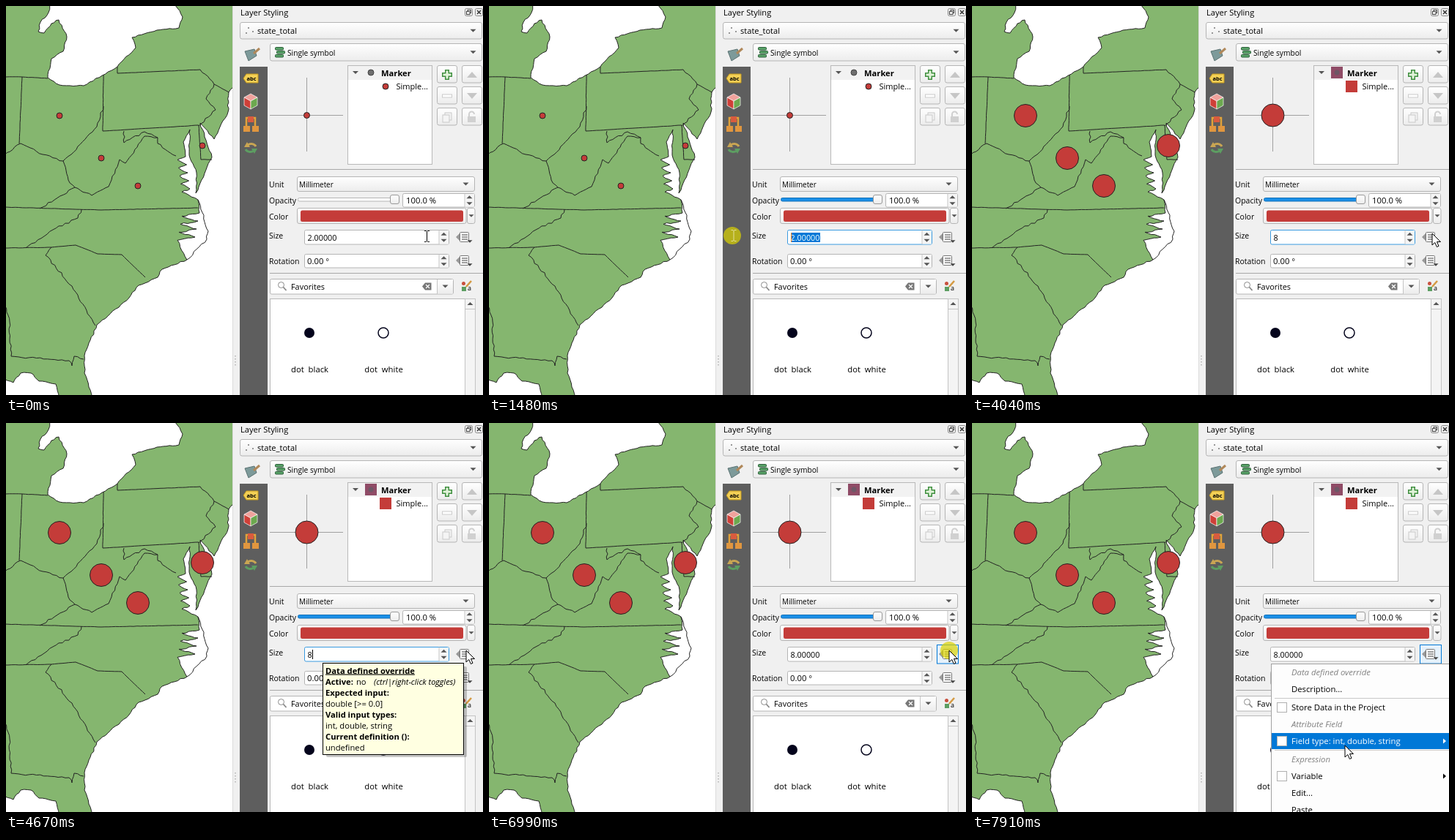
Write an HTML page that moves like this. It is 651x532 px and loops after 7990 ms.

```html
<!DOCTYPE html>
<html lang="en">
<head>
<meta charset="utf-8">
<title>Layer styling panel</title>
<style>
  html, body { margin: 0; width: 100%; height: 100%; overflow: hidden; background: #fff; }
  svg { display: block; width: 100vw; height: 100vh; }
  text { font-family: "Open Sans", "Noto Sans", sans-serif; white-space: pre; }
</style>
</head>
<body>
<svg id="stage" viewBox="0 0 651 532"></svg>
<script>
const LOOP = 7990, RED = '#c43c39', BLUE = '#0078d7', INK = '#232323', EDGE = '#b5b5b5';
const stage = document.getElementById('stage');

// ---- drawing helpers (return SVG markup) ----
const rect = (x, y, w, h, fill, stroke = 'none', r = 0, more = '') =>
  `<rect x="${x}" y="${y}" width="${w}" height="${h}" rx="${r}" fill="${fill}" stroke="${stroke}" ${more}/>`;
const circle = (x, y, r, fill, stroke = 'none', more = '') =>
  `<circle cx="${x}" cy="${y}" r="${r}" fill="${fill}" stroke="${stroke}" ${more}/>`;
const path = (d, fill = 'none', stroke = 'none', width = 1, more = '') =>
  `<path d="${d}" fill="${fill}" stroke="${stroke}" stroke-width="${width}" ${more}/>`;
const line = (d, stroke = '#a8a8a8', width = 1) => path(d, 'none', stroke, width);
const text = (x, y, s, size = 10.7, more = '') =>
  `<text x="${x}" y="${y}" font-size="${size}" ${more}>${s}</text>`;
const group = (id, content) => `<g id="${id}">${content}</g>`;
const each = (list, draw) => list.map(draw).join('');
const triangle = (x, y, dy = 4, half = 4, fill = '#555') =>
  path(`M${x - half} ${y - dy / 2}h${2 * half}l${-half} ${dy}z`, fill);
const button = (x, y, w, h) => rect(x, y, w, h, 'url(#face)', EDGE, 2.5);
const combo = (x, y, w, h) => button(x, y, w, h) + triangle(x + w - 12, y + h / 2);
const spin = (x, y, w, h, id = 'fixed') => rect(x, y, w, h, '#fff', EDGE, 2, `id="${id}"`) +
  rect(x + w - 13, y + .5, 12.5, h - 1, '#f5f5f5') + line(`M${x + w - 13.5} ${y}v${h}`, '#c4c4c4') +
  each([-4, 4], dy => triangle(x + w - 7, y + h / 2 + dy * 1.1, dy));

// ---- map ----
let seed = 7;
const random = () => (seed = seed * 16807 % 2147483647) / 2147483647;

// Breaks a polyline into short pieces and pushes them sideways for a natural edge.
function rough(points, amount) {
  const pts = points.split(' ').map(p => p.split(',').map(Number));
  const out = [pts[0]];
  for (let i = 1; i < pts.length; i++) {
    const [ax, ay] = pts[i - 1], [bx, by] = pts[i];
    const length = Math.hypot(bx - ax, by - ay), n = Math.ceil(length / 5);
    for (let k = 1; k <= n; k++) {
      const push = k < n ? (random() - .5) * 2 * amount / length : 0;
      out.push([ax + (bx - ax) * k / n - (by - ay) * push, ay + (by - ay) * k / n + (bx - ax) * push]);
    }
  }
  return out.map(p => p.map(v => v.toFixed(1)).join(' ')).join('L');
}

// A shore cut by evenly spaced narrow inlets.
const inlets = (x, y, dx, dy, n, depth) => Array.from({ length: n }, (_, i) =>
  `${x + dx * i},${y + dy * i} ${x + dx * i - depth},${y + dy * (i + .4)}`).join(' ');

const coast = [
  '-5,-5 61,-5 58,9 47,22 44,35 52,37 62,24 72,19 83,42 78,62 62,72 57,98 73,108 106,109 152,83 177,57 172,43 206,33 236,30 241,15 229,-5',
  '315,-5 315,106 304,118 303,145 284,182 265,160 281,207 259,256',
  '260,228 250,204 251,169 242,186', inlets(245, 206, 1.5, 11, 5, 11), '262,265',
  inlets(264, 283, -2, 11, 4, 24), '247,347 213,360 207,371 181,382 168,399 124,436 107,478 107,502 119,540',
  '74,540 68,517 45,513 34,502 20,502 10,515 -5,510'
].join(' ');

const rivers = [
  '133,137 124,165 89,203 78,212 50,203 20,188 -2,204',
  '78,212 85,238 94,248 46,277',
  '94,248 117,259 140,247 155,210 163,215 189,178 207,180',
  '161,171 161,187 189,172 207,180 207,188 232,205',
  '265,87 284,107 273,127 286,142 263,164',
  '103,278 98,290 64,306 27,331',
  '62,330 54,341 90,383 122,437',
  '-2,405 5,432 7,479 86,485 90,492 93,479 106,483',
  '262,265 276,308 274,319 247,347'
];
const straight = [
  '0,97 22,97 57,99', '22,97 18,188', '133,94 132,171 263,163 266,210 281,210', '152,83 152,92 265,87',
  '284,107 304,118', '-2,275 130,279 262,276', '-2,331 62,330 95,327 125,339 158,340 190,371'
];
const borders = each(rivers, p => 'M' + rough(p, 1.3)) + each(straight, p => 'M' + rough(p, .2));
const marker = (x, y, cls) => circle(x, y, 4, RED, INK, `class="${cls}"`);
const map = rect(0, 0, 310, 532, '#fff') + path(`M${rough(coast, 1)}Z`, '#85b66f', INK) + line(borders, INK) +
  each([[73, 150], [130, 208], [180, 246], [268, 191]], ([x, y]) => marker(x, y, 'marker'));

// ---- styling panel ----
const overrideIcon = y => path(`M614 ${y}l6 -6v12z`, '#999') + rect(619.5, y - 6.5, 12, 13, '#fff', '#777', 1) +
  each([-3, 0, 3], dy => line(`M622 ${y + dy}h8`, '#777', 1.4)) + triangle(633, y + 6, 3.5, 3.5, '#444');

const windowButtons = each([626.5, 640.5], x => rect(x, 3.5, 10, 10, '#f0f0f0', '#888', 2)) +
  rect(630, 5.5, 4.5, 4, 'none', '#444') + rect(628.5, 7.5, 4.5, 4, '#f0f0f0', '#444') + line('M643 6l5 5m0 -5l-5 5', '#333', 1.5);

const arc = (y, color, turn) => `<g transform="rotate(${turn} 334 ${y})">` +
  line(`M341 ${y - 2}a7 6 0 0 0 -11 -2`, color, 3) + path(`M325 ${y - 1}l4 -7l4 7z`, color) + '</g>';
const sideBar = rect(319, 83, 38, 449, '#5e5e5e') +
  path('M326 62l13 -3l3 9l-11 7z', '#7d9a9a', '#5c7373') + line('M338 65l8 -7', '#b0885a', 3) +
  path('M324 99l4 -6h16v12h-16z', '#f3cf55', '#c59b1f') + text(328.5, 102, 'abc', 7.5, 'font-weight="bold"') +
  each([['l9 -5l9 5l-9 5z', '#f0a29c'], ['v11l9 5v-11z', '#cf4038'], ['m18 0v11l-9 5v-11z', '#6ca84f']],
    ([d, fill]) => path('M325 125' + d, fill, '#fff', .7)) +
  line('M328 164v-11h12v11', '#e2a23a', 2.5) + rect(330, 151, 8, 8, '#d95b3e') +
  each([324, 336], x => rect(x, 164, 9, 8, '#e0963f')) + arc(194, '#c9a553', 0) + arc(194, '#5d9e62', 180);

const toolButtons = each([82, 111, 140], y => each([588.5, 622.5], x => button(x, y - .5, 27, 23.5))) +
  line('M602 87v14M595 94h14', '#3f8f3f', 6) + line('M602 88.5v11M596.5 94h11', '#e2f3da', 3) +
  triangle(636, 94, -8, 7, '#c6c6c6') + triangle(636, 123, 8, 7, '#c6c6c6') + rect(595.5, 121, 13, 4, '#fff', '#ccc') +
  each([0, 3], d => rect(599 - d, 146 + d, 9, 10, '#f4f4f4', '#c9c9c9')) +
  rect(630, 151, 11, 8, '#d0d0d0') + line('M632 151v-3a3.5 3.5 0 0 1 7 0', '#d0d0d0', 2);

const symbolTree = rect(466.5, 81.5, 115, 135, '#fff', '#b9b9b9') + rect(467, 82, 114, 19, '#f2f2f2') + triangle(477, 91) +
  text(512, 96, 'Marker', 11.2, 'font-weight="bold"') + text(532.5, 114, 'Simple...', 11) +
  group('smallTree', circle(498, 91, 4, '#6e6e6e', '#444') + circle(518, 110, 4, RED, INK)) +
  group('bigTree', rect(490, 83, 16, 16, '#8f4b66') + circle(498, 91, 3.5, '#6d5766') + rect(510, 102, 16, 16, RED));

const properties = each([['Unit', 248], ['Opacity', 270], ['Color', 292], ['Size', 318], ['Rotation', 353]],
    ([label, y]) => text(359, y, label, 10.5)) +
  combo(397.5, 233.5, 242, 20) + text(400, 248, 'Millimeter', 9.9) +
  rect(398.5, 262.5, 132, 4.5, '#fff', EDGE, 2, 'id="groove"') + rect(524.5, 258.5, 12, 12, 'url(#face)', '#999', 2.5) +
  spin(541.5, 256.5, 98, 18.5) + text(546, 270, '100.0 %', 11.3) +
  button(397.5, 276.5, 230.5, 21) + rect(402, 279.5, 222, 15.5, RED, 'none', 2.5) +
  button(629.5, 276.5, 10.5, 21) + triangle(635, 287, 3.5, 3.5) +
  spin(407.5, 306.5, 197, 19.5, 'sizeBox') + rect(412, 310, 40, 13, BLUE, 'none', 0, 'id="selection"') +
  text(411.5, 321, '', 10.8, 'id="sizeText"') + rect(0, 310, 1, 13, '#000', 'none', 0, 'id="caret"') +
  rect(611.5, 303.5, 29, 25.5, '#e5f1fb', BLUE, 0, 'id="pressed"') +
  spin(407.5, 339.5, 197, 18.5) + text(411, 353, '0.00 °', 11.3) + each([316, 348], overrideIcon);

const library = rect(360.5, 373.5, 250, 20.5, '#fff', EDGE, 2) + rect(589, 374, 21, 19.5, 'url(#face)') +
  line('M588.5 374v20', '#c4c4c4') + triangle(599.5, 383.5) +
  circle(375.5, 381.5, 4, 'none', '#888') + line('M378.5 384.5l4 4.5', '#888', 1.8) + text(389, 388, 'Favorites', 10.9) +
  path('M568 383.5l4 -5h8.5v10h-8.5z', '#777') + line('M573 381l5 5m0 -5l-5 5', '#fff', 1.2) +
  circle(624.5, 379.5, 2.5, '#c9503e') + rect(622, 384, 6, 6, '#5d9e62') + line('M628 384l7 -8', '#d49a42', 2.5) + text(630, 389, 'a', 9) +
  rect(360.5, 400.5, 280, 140, '#fff', '#b9b9b9') + rect(626.5, 400.5, 14, 140, '#f4f4f4', '#c4c4c4') +
  line('M627 414.5h13', '#c4c4c4') + triangle(633.5, 407, -4) +
  each([['black', 414, '#04041c'], ['white', 515, '#fff']], ([name, x, fill]) =>
    circle(x, 447, 7, fill, '#04041c', `stroke-width="${name === 'white' ? 1.5 : 0}"`) +
    text(x + .5, 501, 'dot  ' + name, 11.3, 'text-anchor="middle"'));

const panel = rect(309, 0, 342, 532, '#f0f0f0') + line('M309.5 0v532', '#dcdcdc') +
  path('M313 478v16', 'none', '#b0b0b0', 1.5, 'stroke-dasharray="1.5 2.5"') +
  text(320, 13, 'Layer Styling', 11.1) + windowButtons +
  combo(319.5, 22.5, 330, 22.5) + each([[331, 30], [328, 37], [337, 35]], ([x, y]) => circle(x, y, 1, '#777')) +
  text(343, 38, 'state_total', 11.1) + combo(360.5, 51.5, 289, 23.5) +
  each([0, 1, 2], i => rect(367.5 + i % 2 * 2, 56.5 + i * 5, 11, 3.5, '#5aa469', '#2d5f3a', 1)) +
  text(384, 68, 'Single symbol', 10.2) + sideBar +
  line('M360 149.5h100M410.5 98v101', '#a0a0a0') + marker(410.5, 149.5, 'preview') +
  symbolTree + toolButtons + line('M360 223.5h291M360 365.5h291') + properties + library;

// ---- tooltip and menu ----
const bold = 'font-weight="bold"', italic = 'font-style="italic"';
const tipLines = ['Data defined override', 'Active:', 'Expected input:', 'double [&gt;= 0.0]',
  'Valid input types:', 'int, double, string', 'Current definition ():', 'undefined'];
const tooltip = rect(437, 333, 192, 124, '#000', 'none', 2, 'opacity=".22"') + rect(432.5, 328.5, 192, 125, '#ffffe1', '#000') +
  each(tipLines, (s, i) => text(436, 342.5 + i * 15.05, s, 11.2,
    (/:$|override/.test(s) ? bold : '') + (i ? '' : ' text-decoration="underline"'))) +
  text(478, 357.5, 'no', 11.2) + text(502, 357.5, '(ctrl|right-click toggles)', 11, italic);

const items = [
  { label: 'Data defined override', head: true }, { label: 'Description...' },
  { label: 'Store Data in the Project', box: true, rule: true }, { label: 'Attribute Field', head: true },
  { label: 'Field type: int, double, string', box: true, more: true },
  { label: 'Expression', head: true, rule: true }, { label: 'Variable', box: true, more: true },
  { label: 'Edit...' }, { label: 'Paste' }
];
let itemY = 318;
for (const item of items) item.y = itemY += item.rule ? 25 : 23;

const menu = rect(408.5, 329.5, 250, 210, '#fdfdfd', '#a0a0a0') + rect(409, 0, 242, 22, BLUE, 'none', 0, 'id="hover"') +
  each(items, ({ label, y, head, box, more, rule }) =>
    (rule ? line(`M413 ${Math.round(y) - 12.5}h238`, '#c8c8c8') : '') +
    (box ? rect(416.5, y - 6.5, 13, 13, '#fff', '#b0b0b0') : '') +
    `<g class="item">${text(436, y + 4, label, 11.3, head ? italic : '')}` +
    (more ? `<path d="M643 ${y - 3.5}l4 3.5l-4 3.5z"/>` : '') + '</g>');

const beam = line('M-3.5 -7.5h2.5l1 1l1 -1h2.5M-3.5 7.5h2.5l1 -1l1 1h2.5M0 -7v14', 'inherit');
const arrow = path('M0 0V16L3.8 12.5L6.4 18.5L9 17.3L6.5 11.5H11.5Z', '#fff', '#000');

stage.innerHTML = `<defs><linearGradient id="face" x2="0" y2="1"><stop stop-color="#fff"/>
  <stop offset="1" stop-color="#ececec"/></linearGradient></defs>` + map + panel + group('tooltip', tooltip) +
  group('menu', menu) + circle(0, 0, 12, '#dcd300', 'none', 'id="click" opacity=".7"') +
  group('beam', beam) + group('arrow', arrow);

// ---- timeline ----
const el = Object.fromEntries([...stage.querySelectorAll('[id]')].map(e => [e.id, e]));
const markerEls = stage.querySelectorAll('.marker'), itemEls = stage.querySelectorAll('.item');
const preview = stage.querySelector('.preview');
const set = (e, name, value) => e.setAttribute(name, value);
const show = (e, on) => set(e, 'display', on ? 'inline' : 'none');
const within = (t, a, b) => t >= a && t < b;

const PRESS = 1330, TYPE = 2400, TIP = 4670, OPEN = 6990, BLINK = 530;
const moves = [
  { start: 1000, end: 1180, steps: 3, to: [492.5, 315] },
  { start: PRESS, end: 1480, steps: 3, to: [334, 314] },
  { start: 1620, end: 1621, steps: 1, to: [329, 314] },
  { start: 3260, end: 3890, steps: 9, to: [628, 311], lift: 21 },
  { start: 7680, end: 7910, steps: 4, to: [509, 441], lift: 20 }
];

// The pointer jumps in even steps along each move; lift bows the way upwards.
function pointer(t) {
  let at = [574.5, 315];
  for (const { start, end, steps, to, lift = 0 } of moves) {
    if (t < start) break;
    const step = Math.floor((t - start) / (end - start) * (steps - 1) + 1e-6) + 1;
    const k = Math.min(1, step / steps);
    at = at.map((v, i) => v + (to[i] - v) * k - i * lift * Math.sin(Math.PI * k));
  }
  return at;
}

function render(t) {
  const [x, y] = pointer(t), active = t >= PRESS, typed = t >= TYPE, opened = t >= OPEN;
  const menuOpen = t >= OPEN + 80, selected = within(t, 1400, TYPE);

  set(el.groove, 'fill', active ? '#1a8fe8' : '#fff');
  set(el.groove, 'stroke', active ? '#1673b8' : EDGE);
  set(el.sizeBox, 'stroke', active && !opened ? '#3a9be0' : EDGE);
  el.sizeText.textContent = !typed ? '2.00000' : opened ? '8.00000' : '8';
  set(el.sizeText, 'fill', selected ? '#fff' : '#000');
  show(el.selection, selected);

  const blink = Math.floor(Math.max(0, t - (typed ? 2450 : 1320)) / BLINK);
  show(el.caret, (selected || typed) && !opened && blink % 2 === 0);
  set(el.caret, 'x', typed ? 418 : 412);
  set(el.caret, 'fill', typed ? '#000' : '#ff8728');

  markerEls.forEach(m => set(m, 'r', t >= TYPE + 75 ? 15.5 : 4));
  set(preview, 'r', typed ? 15.5 : 4);
  show(el.smallTree, !typed);
  show(el.bigTree, typed);

  show(el.tooltip, within(t, TIP, OPEN));
  show(el.pressed, opened);
  show(el.menu, menuOpen);
  const hovered = menuOpen ? items.findIndex(i => !i.head && Math.abs(y + 1 - i.y) < 11) : -1;
  show(el.hover, hovered >= 0);
  if (hovered >= 0) set(el.hover, 'y', items[hovered].y - 11);
  itemEls.forEach((e, i) => set(e, 'fill', i === hovered ? '#fff' : items[i].head ? '#808080' : '#000'));

  const isBeam = t < 1620, place = `translate(${x} ${y})`;
  show(el.beam, isBeam);
  show(el.arrow, !isBeam);
  set(el.beam, 'transform', place);
  set(el.beam, 'stroke', x < 357 ? '#e4e09a' : '#000');
  set(el.arrow, 'transform', place);
  show(el.click, within(t, PRESS, 1550) || within(t, OPEN, OPEN + 160));
  set(el.click, 'transform', `translate(${isBeam ? x - 2 : x} ${y})`);
}

const start = performance.now();
function tick() {
  render((performance.now() - start) % LOOP);
  requestAnimationFrame(tick);
}
tick();
</script>
</body>
</html>
```
